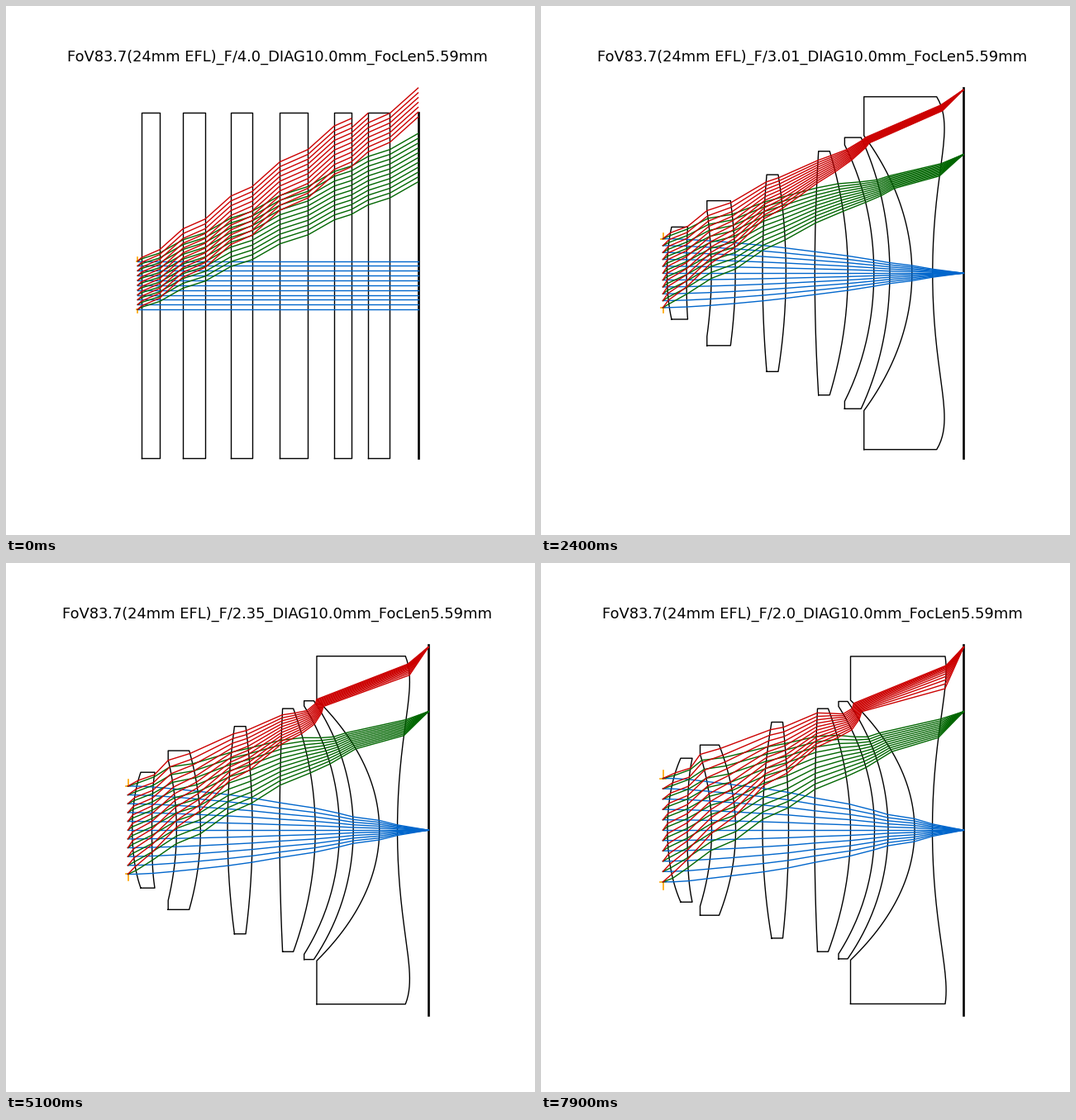
These frames come from a looping animation (640 by 640 pixels, 8000 ms). A matplotlib script:

```python
import numpy as np
import matplotlib.pyplot as plt
from matplotlib.animation import FuncAnimation

FRAMES, INTERVAL = 80, 100
FOCAL, PX_PER_MM = 5.59, 44.8
HALF = 5 * PX_PER_MM                # sensor half height
STOP, SENSOR, MID = 147.5, 510.5, 328
BASE, SPAN = 547.2, 448             # bottom and height of the plotted area
BENT_AT = 11                        # the plates have become lenses by here
U = np.linspace(1, -1, 11)          # pupil positions, top to bottom


def slow(w):
    return w ** 1.6


def even(w):
    return w


def fast(w):
    return 1 - (1 - w) ** 3


# Per lens: easing, quartic share of both faces, then the pose at a small and
# at a wide aperture: left and right vertex, half height, left lip, both sags.
LENSES = [
    (slow, .2, .6, (152.5, 176, 53, 0, 4.5, 1), (153, 177, 87, 0, 16, 6)),
    (even, 0, 0, (206, 235, 83.5, 11, -3, -2), (206.5, 235.5, 103, 11, -14, -20)),
    (even, 0, 0, (268, 295.5, 116, 0, 3.5, -10), (268, 299.5, 130.7, 0, 11, -7)),
    (fast, 0, 0, (331.5, 368, 148, 0, 5.5, -17), (331, 374.5, 147, 0, 3.5, -27)),
    (fast, .1, .1, (402, 424, 172.7, 12, -27, -20), (403.5, 420, 155.7, 6, -43.5, -49)),
    (fast, .05, 0, (445.5, 474, 216.7, 41, -38, 4), (452, 473.5, 210.2, 53, -77.5, 15.5)),
]
FACES = 2 * len(LENSES)
VERTEX = np.array([x for lens in LENSES for x in lens[3][:2]])
DEPTH = (np.r_[VERTEX, SENSOR] - STOP) / (SENSOR - STOP)

# Per field: colour, slopes in air and in glass, chief ray height on each face
# and the sensor, taper exponents, least spread, dip and coma at wide aperture.
FIELDS = [
    ("#0066CC", 0, 0, np.zeros(FACES + 1), 1.6, 1.15, .1, 0, 0),
    ("#006600", .57, .32,
     np.array([4, 14, 30, 38, 57, 66, 82, 92, 99, 104.5, 111, 125.5, 143.5]),
     1.2, 1.15, .18, 6, 0),
    ("#CC0000", .896, .44,
     np.array([8, 20, 44, 58, 88, 97, 123, 134, 146.5, 160.5, 164, 201.5, 221.5]),
     1, 1.55, .08, 20, 18),
]


def mix(a, b, t):
    return a + (b - a) * t


def f_number(i):
    return 1 / (.25 + .25 * min(1, 1.1 * i / FRAMES))


def aperture(f):
    return FOCAL / (2 * f) * PX_PER_MM


SMALL, WIDE = aperture(f_number(BENT_AT)), aperture(2)


class Face:
    def __init__(self, x, radius, sag, quartic, swell=0):
        self.x, self.radius, self.sag = x, radius, sag
        self.quartic, self.swell = quartic, swell

    def at(self, y):
        """x of the face at height y."""
        t2 = np.minimum((y / self.radius) ** 2, 1.05)
        if self.swell:
            return self.x + self.swell * t2 + (self.sag - self.swell) * t2 ** 4
        return self.x + self.sag * mix(t2, t2 ** 2, self.quartic)


class System:
    """The lens at one step of its growth, heights measured from the axis."""

    def __init__(self, i):
        self.f = f_number(i)
        self.r = aperture(self.f)
        self.w = max(0, (self.r - SMALL) / (WIDE - SMALL))
        self.grown = 1 - .25 ** i if i < BENT_AT else 1
        self.faces = [face for lens in LENSES for face in self.bend(*lens)]
        last, tail = self.faces[-1], LENSES[-1]
        last.sag = self.grown * mix(tail[3][5], tail[4][5], slow(self.w))
        last.swell = self.grown * mix(29, 26, self.w)

    def bend(self, ease, ql, qr, small, wide):
        xl, xr, h, lip, sl, sr = mix(np.array(small), np.array(wide), ease(self.w))
        g = self.grown
        h = mix(HALF, h, g)
        return Face(xl, h - g * lip, g * sl, ql), Face(xr, h, g * sr, qr)

    def outline(self, n):
        a, b = self.faces[2 * n:2 * n + 2]
        h, rim = b.radius, a.x + a.sag
        ya = np.linspace(-a.radius, a.radius, 61)
        yb = np.linspace(h, -h, 81)
        return np.r_[rim, a.at(ya), rim, b.at(yb), rim], np.r_[-h, ya, h, yb, -h]

    def heights(self, field, u):
        _, air, glass, chief, m, p, least, dip, coma = field
        steps = np.diff(np.r_[STOP, VERTEX, SENSOR])
        slopes = np.where(np.arange(FACES + 1) % 2, glass, air)
        flat = np.cumsum(steps * slopes) + self.r * u

        spread = np.maximum((1 - DEPTH ** m) ** p, least)
        spread[-1] = 0
        k = np.arange(FACES + 1)
        sink = dip * self.w * np.exp(-((k - 9) / 2) ** 2) * (k < FACES)
        bent = chief - sink + self.r * u * spread
        bent[FACES - 1] -= coma * self.w ** 3 * ((1 - u) / 2) ** 3
        return mix(flat, bent, self.grown)

    def ray(self, field, u):
        ys = self.heights(field, u)
        px, py = [STOP], [self.r * u]
        for face, y in zip(self.faces, ys):
            if abs(y) > face.radius + 2:        # blocked by the rim
                break
            px.append(face.at(y))
            py.append(y)
        else:
            px.append(SENSOR + .8 * self.w)
            py.append(ys[-1])
        return np.array(px), np.array(py)


fig = plt.figure(figsize=(6.4, 6.4), dpi=100, facecolor="white")
ax = fig.add_axes([0, 0, 1, 1])
ax.set(xlim=(0, 640), ylim=(640, 0))
ax.axis("off")


def line(color, width):
    return ax.plot([], [], color=color, lw=width)[0]


stop_marks = [line("orange", 1.2) for _ in range(4)]
lenses = [line("black", 1.0) for _ in LENSES]
sensor = line("black", 1.9)
rays = [(field, u, line(field[0], 1.0)) for field in FIELDS for u in U]
title = ax.text(MID, 66.5, "", ha="center", va="baseline", fontsize=12.84,
                family="DejaVu Sans")


def update(i):
    s = System(i)
    paths = [s.ray(field, u) for field, u, _ in rays]
    # The view zooms out when rays overshoot the sensor.
    top = max(HALF, max(y.max() for _, y in paths))
    zoom = SPAN / (HALF + top)
    axis = BASE - HALF * zoom

    def place(art, x, y):
        art.set_data(MID + (np.asarray(x) - MID) * zoom, axis - np.asarray(y) * zoom)

    title.set_text(f"FoV83.7(24mm EFL)_F/{round(s.f, 2)}_DIAG10.0mm_FocLen5.59mm")
    for n, y in enumerate((s.r, -s.r)):
        place(stop_marks[2 * n], [STOP - .05 * s.r, STOP + .05 * s.r], [y, y])
        place(stop_marks[2 * n + 1], [STOP, STOP], [y, 1.15 * y])
    for n, lens in enumerate(lenses):
        place(lens, *s.outline(n))
    place(sensor, [SENSOR + .8 * s.w] * 2, [-HALF, HALF])
    for (_, _, art), path in zip(rays, paths):
        place(art, *path)
    return [title, sensor, *stop_marks, *lenses, *(art for _, _, art in rays)]


anim = FuncAnimation(fig, update, frames=FRAMES, interval=INTERVAL,
                     repeat=True, repeat_delay=0, blit=False)
plt.show()
```
